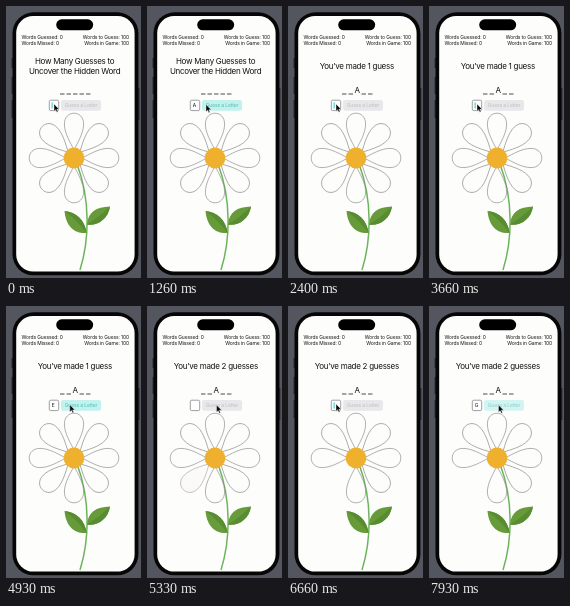
An HTML page for the animation above (8000 ms loop, 135 by 272 pixels).

```html
<!DOCTYPE html>
<html lang="en">
<head>
<meta charset="utf-8">
<title>Word guessing game</title>
<style>
  html, body { margin: 0; width: 100%; height: 100%; overflow: hidden; background: #53565e; }
  svg { display: block; width: 100%; height: 100%; }
  text { font-family: Inter, "Liberation Sans", sans-serif; font-size: 4.95px; letter-spacing: -.02em; fill: #111; }
  .title { font-size: 8px; letter-spacing: -.035em; text-anchor: middle; }
  .end { text-anchor: end; }
  .mid { text-anchor: middle; }
</style>
</head>
<body>
<svg viewBox="0 0 135 272" preserveAspectRatio="none">
  <defs>
    <path id="petal" d="M0 -8C-4 -16 -9.6 -25 -9.6 -34C-9.6 -41 -5 -44.8 0 -44.8C5 -44.8 9.6 -41 9.6 -34C9.6 -25 4 -16 0 -8Z"/>
    <linearGradient id="tan" x1="0" y1="1" x2="0" y2="0">
      <stop offset="0" stop-color="#f8f3ed"/>
      <stop offset="1" stop-color="#d3bfab"/>
    </linearGradient>
  </defs>

  <path d="M6.3 52v10M6.3 71v17M6.3 94v18M132.6 82v32" stroke="#2b2c30" stroke-width="1.6"/>
  <rect x="6.5" y="6.3" width="125.9" height="263" rx="21" fill="#060607"/>
  <rect x="10.2" y="10" width="118.4" height="255.6" rx="17" fill="#fdfdfc"/>
  <rect x="50.2" y="13.3" width="37" height="11" rx="5.5" fill="#000"/>

  <text x="15.5" y="32.6">Words Guessed: 0</text>
  <text x="15.5" y="39.4">Words Missed: 0</text>
  <text x="123" y="32.6" class="end">Words to Guess: 100</text>
  <text x="123" y="39.4" class="end">Words in Game: 100</text>

  <g id="intro">
    <text x="68.6" y="57.6" class="title">How Many Guesses to</text>
    <text x="68.6" y="67.7" class="title">Uncover the Hidden Word</text>
  </g>
  <text id="message" x="68.8" y="62.7" class="title"></text>

  <g id="blanks" stroke="#111" stroke-width=".75"></g>
  <text id="found" x="69" y="86.8" class="title">A</text>

  <rect x="43.3" y="94.2" width="9.4" height="10.4" rx="1.5" fill="#fff" stroke="#77777c" stroke-width=".7"/>
  <text id="letter" x="45.7" y="101.2"></text>
  <rect id="caret" y="96.3" width=".8" height="6.2" fill="#00b9b0"/>
  <g id="button">
    <rect id="fill" x="55" y="94" width="40" height="10.8" rx="2.2"/>
    <text id="label" x="75" y="101.2" class="mid">Guess a Letter</text>
  </g>

  <g id="flower">
    <path d="M71 158C85 195 83 235 74 264" fill="none" stroke="#6bb45c" stroke-width="1.5"/>
    <path d="M80.5 227C70 228 60 222 58.5 205C70 206 79 214 80.5 227Z" fill="#679a39"/>
    <path d="M80.5 227Q71 214 58.5 205C70 206 79 214 80.5 227Z" fill="#578c31"/>
    <path d="M81 218.5C82 206 90 201 104 200.5C102 213 92 220 81 218.5Z" fill="#679a39"/>
    <path d="M81 218.5Q92 212 104 200.5C102 213 92 220 81 218.5Z" fill="#578c31"/>
    <g id="petals" fill="#fdfdfc" stroke="#707070" stroke-width=".55"></g>
    <use id="wilt" href="#petal" transform="translate(68 152) rotate(225)" fill="url(#tan)"/>
    <circle cx="68" cy="152" r="10.4" fill="#efb02d"/>
  </g>

  <path id="pointer" d="M0 0V7.2L1.7 5.7L2.8 8.2L4 7.7L2.9 5.2H5.2Z" fill="#0a0a0a" stroke="#fff" stroke-width=".4"/>
</svg>
<script>
const LOOP = 8000, BLINK = 1000, FADE = 1500;

// One guess each: focus the field, type, move to the button, submit, move back.
const rounds = [
  { letter: "A", focus: -400, type: 600, move: 1195, submit: 1730, back: 1860 },
  { letter: "E", focus: 2260, type: 4330, move: 4845, submit: 5200, back: 5530 },
  { letter: "G", focus: 6200, type: 7260, move: 7800, submit: LOOP, back: LOOP }
];
const [hit, miss] = rounds.map(r => r.submit);

const el = id => document.getElementById(id);
const show = (node, amount) => node.style.opacity = +amount;
const clamp = v => Math.min(1, Math.max(0, v));
const ramp = (t, from, span) => clamp((t - from) / span);
const smooth = p => p * p * (3 - 2 * p);

function add(parent, tag, attrs) {
  const node = document.createElementNS("http://www.w3.org/2000/svg", tag);
  for (const name in attrs) node.setAttribute(name, attrs[name]);
  return parent.appendChild(node);
}

const blanks = Array.from({ length: 5 }, (_, i) => {
  const x = 54 + i * 6.5;
  return add(el("blanks"), "line", { x1: x, x2: x + 4.5, y1: 88, y2: 88 });
});
const petals = Array.from({ length: 8 }, (_, i) =>
  add(el("petals"), "use", { href: "#petal", transform: `translate(68 152) rotate(${i * 45})` }));

function drawText(t) {
  const guessed = t >= hit;
  show(el("intro"), !guessed);
  show(el("found"), guessed);
  show(blanks[2], !guessed);
  el("message").textContent = !guessed ? "" : t < miss ? "You’ve made 1 guess" : "You’ve made 2 guesses";
}

function drawForm(t) {
  const round = rounds.find(r => t >= r.focus && t < r.submit);
  const filled = round && t >= round.type;
  const wave = round ? Math.sin((t - round.focus) / BLINK * 2 * Math.PI) : -1;
  el("letter").textContent = filled ? round.letter : "";
  el("caret").setAttribute("x", filled ? 49.6 : 45.7);
  show(el("caret"), clamp(.5 + 2.5 * wave));
  el("fill").style.fill = filled ? "#c1f2ee" : "#e8e8ea";
  el("label").style.fill = filled ? "#4fb9b2" : "#bdbdc1";
  show(el("button"), filled && t > round.submit - 70 ? .7 : 1);
}

function drawFlower(t) {
  const wilt = Math.sin(Math.PI * ramp(t, miss, FADE)) ** 2;
  show(petals[5], 1 - ramp(t, miss, FADE / 3));
  show(el("wilt"), wilt);
  show(el("flower"), 1 - .15 * wilt);
}

function drawPointer(t) {
  const p = rounds.reduce((sum, r) =>
    sum + smooth(ramp(t, r.move, 130)) - smooth(ramp(t, r.back, 400)), 0);
  el("pointer").setAttribute("transform", `translate(${48 + 21.5 * p} ${98 + p})`);
}

const start = performance.now();
function tick(now) {
  const t = Math.max(0, now - start) % LOOP;
  for (const draw of [drawText, drawForm, drawFlower, drawPointer]) draw(t);
  requestAnimationFrame(tick);
}
tick(start);
</script>
</body>
</html>
```
